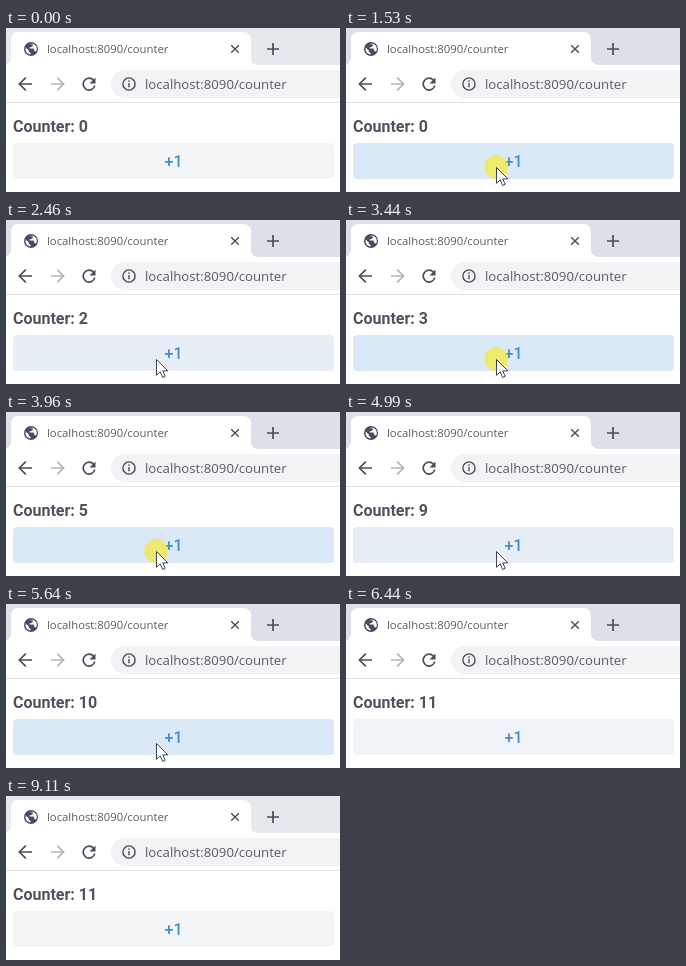
Animation, 334 px wide and 164 px high, one loop 9210 ms. Source, as an HTML page:

```html
<!DOCTYPE html>
<html lang="en">
<head>
<meta charset="utf-8">
<title>Counter</title>
<style>
  html, body { margin: 0; width: 100%; height: 100%; overflow: hidden; background: #fff; }
  svg { display: block; width: 334px; height: 164px; }
  .url { font-family: "Open Sans", sans-serif; fill: #5a5a68; }
  .page { font-family: Roboto, sans-serif; font-size: 16px; }
  .line { fill: none; stroke: #4d4b5e; stroke-width: 1.7; }
  .thin { stroke-width: 1.4; }
  .faint { stroke: #b9b3ac; }
</style>
</head>
<body>
<svg viewBox="0 0 334 164">
  <rect id="strip" width="334" height="37"/>
  <path d="M-3 37q8 0 8-8V12q0-8 8-8H237q8 0 8 8V29q0 8 8 8z" fill="#fff"/>

  <!-- tab -->
  <circle cx="25" cy="21" r="7" fill="#4b4a5e"/>
  <path d="M19.7 19.5l3.1 2.9v1.4l1.8 1.3v1.4c-3.6-.5-5.7-3.5-4.9-7zM23.4 16.3h3.3v1.6l-1.5 1.3h-1.6v1.4h4l.9 2.3 1.5.9c1.2-2.2 1-5.1-.8-6.7l-1.3-.9-1.7-.6z" fill="#fff"/>
  <text class="url" x="41" y="25" font-size="11.3">localhost:8090/counter</text>
  <path class="line thin" d="M225.2 17.2l7.6 7.6m0-7.6l-7.6 7.6"/>
  <path class="line" d="M261 21h12m-6-6v12"/>

  <!-- toolbar -->
  <path class="line" d="M26 56H13.5m6.3-6.4L13.4 56l6.4 6.4"/>
  <path class="line faint" d="M45 56H57.5m-6.3-6.4l6.4 6.4-6.4 6.4"/>
  <path class="line" d="M87.6 52.3A5.9 5.9 0 1 0 88.8 57.6"/>
  <path d="M89.5 49.4v6h-6z" fill="#4d4b5e"/>
  <rect x="105" y="42" width="260" height="28" rx="14" fill="#f1f3f4"/>
  <circle class="line thin" cx="123" cy="56" r="6.1"/>
  <path class="line thin" d="M123 55v4.2m0-7v1.6"/>
  <text class="url" x="139" y="61" font-size="13.2">localhost:8090/counter</text>
  <path d="M0 74.5h334" stroke="#dfe1e4"/>

  <!-- page -->
  <text class="page" id="label" x="7" y="104" font-weight="700" fill="#53515f">Counter: 0</text>
  <rect id="button" x="7" y="115" width="321" height="36" rx="4"/>
  <text class="page" x="167.5" y="139" font-weight="500" text-anchor="middle" fill="#4590cb">+1</text>

  <g id="pointer">
    <circle id="halo" r="12" fill="#f5e93c" fill-opacity=".72"/>
    <path d="M.5.5V16.3l3.7-3.5 2.5 5.7 2.5-1.1-2.4-5.5h5z" fill="#fff" stroke="#3d4052"/>
  </g>
</svg>
<script>
const LOOP = 9210, ENTER = 910, LEAVE = 6250, GONE = 6440, SETTLE = 9110;
const REST = [244, 245, 246], HOVER = [232, 238, 246], DOWN = [219, 232, 247], AFTER = [240, 244, 248];
const byId = id => document.getElementById(id);
const strip = byId('strip'), label = byId('label'), button = byId('button');
const pointer = byId('pointer'), halo = byId('halo');

// press and release of the mouse, start of the dark tint, end of its fade
const click = (press, hold = 70, fade = 230, dark = press) =>
  ({ press, release: press + hold, dark, end: press + hold + fade });
const clicks = [
  click(1530, 80, 290),
  click(2170, 150, 140, 2320),
  ...Array.from({ length: 7 }, (_, i) => click(3160 + 260 * i, 70, 200)),
  click(5310), click(5570, 70, 240)
];

const clamp = x => Math.min(1, Math.max(0, x));
const progress = (t, from, to) => clamp((t - from) / (to - from));
const mix = (a, b, k) => a.map((v, i) => v + (b[i] - v) * k);

// moves in n jumps, the first one at `from` and the last one at `to`
function jumps(t, from, to, n) {
  return clamp(Math.floor((t - from) / (to - from) * (n - 1) + 1.001) / n);
}

function position(t) {
  if (t < ENTER || t >= GONE) return null;
  if (t < 1140) return mix([158, 170], [153, 152], jumps(t, ENTER, 1000, 3));
  if (t < LEAVE) return mix([153, 152], [150, 139], jumps(t, 1140, 1330, 5));
  return mix([150, 139], [154, 166], jumps(t, LEAVE, GONE, 5));
}

function buttonColor(t) {
  if (t >= SETTLE) return REST;
  if (t >= LEAVE) return mix(HOVER, AFTER, progress(t, LEAVE, GONE));
  const base = mix(REST, HOVER, progress(t, 1280, 1480));
  const last = clicks.filter(c => t >= c.dark).pop();
  if (!last) return base;
  return mix(base, DOWN, 1 - progress(t, last.release, last.end));
}

function draw(t) {
  const count = clicks.filter(c => t >= c.release + 50).length;
  label.textContent = 'Counter: ' + count;
  strip.setAttribute('fill', t < ENTER || t >= SETTLE ? '#e5e8ec' : '#dde0e6');
  button.setAttribute('fill', `rgb(${buttonColor(t).map(Math.round)})`);
  const at = position(t);
  pointer.style.display = at ? '' : 'none';
  if (at) pointer.setAttribute('transform', `translate(${at.map(Math.round)})`);
  const pressed = clicks.some(c => t >= c.press && t < c.release);
  halo.style.display = pressed ? '' : 'none';
}

const start = performance.now();
function frame() {
  draw((performance.now() - start) % LOOP);
  requestAnimationFrame(frame);
}
frame();
</script>
</body>
</html>
```
